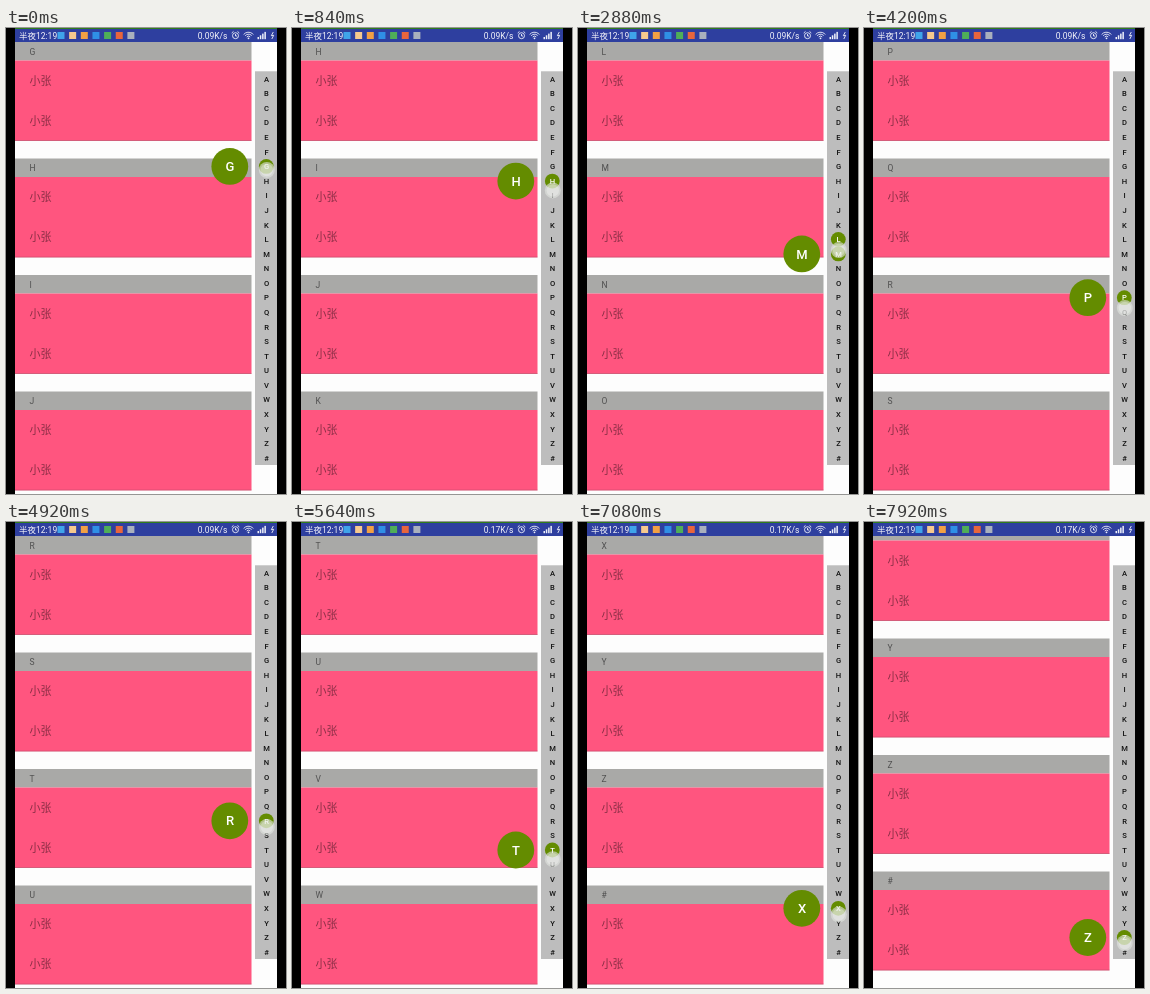
Animation of 280 by 466 pixels, one loop 8000 ms. Source, as an HTML page with a canvas:

```html
<!DOCTYPE html>
<html lang="zh">
<head>
<meta charset="utf-8">
<style>
  html, body { margin: 0; width: 100%; height: 100%; overflow: hidden; background: #000; }
  canvas { display: block; width: 280px; height: 466px; }
</style>
</head>
<body>
<canvas id="stage"></canvas>
<script>
const LOOP = 8000, STEP = 120;
const LETTERS = [...'ABCDEFGHIJKLMNOPQRSTUVWXYZ#'];
const GROUP = 116.5, TOP = 14, HEADER = 18.5, BODY = 80.3;
const BAR_TOP = 43.7, CELL = 14.58;
const MAX_SCROLL = LETTERS.length * GROUP - (466 - TOP);
const GREEN = '#648c00', PINK = '#ff557f', GRAY = '#a9a9a7';
const FONT = 'Roboto, "Noto Sans CJK SC", "Noto Sans CJK", sans-serif';
const SELECT_LAG = 90, SCROLL_LAG = 160;

// finger height over time: [ms, y]
const TOUCH = [[0, 142], [1560, 180], [2880, 222], [4200, 280], [4920, 305], [6240, 364], [7920, 421]];

const canvas = document.getElementById('stage');
const dpr = window.devicePixelRatio || 1;
canvas.width = 280 * dpr;
canvas.height = 466 * dpr;
const ctx = canvas.getContext('2d');
ctx.scale(dpr, dpr);
ctx.textBaseline = 'middle';

function touchAt(time) {
  if (time <= 0) return TOUCH[0][1];
  for (let i = 1; i < TOUCH.length; i++) {
    const [t0, y0] = TOUCH[i - 1], [t1, y1] = TOUCH[i];
    if (time <= t1) return y0 + (y1 - y0) * (time - t0) / (t1 - t0);
  }
  return TOUCH[TOUCH.length - 1][1];
}

const indexAt = time => Math.floor((touchAt(time) - BAR_TOP) / CELL);
const cellY = i => BAR_TOP + (i + 0.5) * CELL;

function rect(x, y, w, h, color) {
  ctx.fillStyle = color;
  ctx.fillRect(x, y, w, h);
}

function disc(x, y, r, color) {
  ctx.fillStyle = color;
  ctx.beginPath();
  ctx.arc(x, y, r, 0, Math.PI * 2);
  ctx.fill();
}

function text(str, x, y, size, color, align = 'left', weight = 400) {
  ctx.font = `${weight} ${size}px ${FONT}`;
  ctx.textAlign = align;
  ctx.fillStyle = color;
  ctx.fillText(str, x, y);
}

function arc(x, y, r, from, to) {
  ctx.beginPath();
  ctx.arc(x, y, r, from, to);
  ctx.stroke();
}

function line(...points) {
  ctx.beginPath();
  points.forEach(([x, y]) => ctx.lineTo(x, y));
  ctx.stroke();
}

function drawList(index) {
  const scroll = Math.min(index * GROUP, MAX_SCROLL);
  LETTERS.forEach((letter, i) => {
    const y = TOP + i * GROUP - scroll;
    if (y < -GROUP || y > 466) return;
    rect(9, y, 236.5, HEADER, GRAY);
    rect(9, y + HEADER, 236.5, BODY, PINK);
    rect(9, y + HEADER + BODY - 0.5, 236.5, 0.5, '#a8445f');
    text(letter, 23.5, y + 10.3, 8.5, '#505050');
    for (const row of [39.3, 79.3]) text('小张', 23.5, y + row, 11, '#8b2f46');
  });
}

function drawStatus(time) {
  rect(9, 0, 262, TOP, '#2e3f9f');
  rect(9, 0, 262, 1, '#2f7d1c');
  text('半夜12:19', 13, 8, 8.5, '#f4f4fa');
  ['#3fa4ea', '#f6c98e', '#f2a044', '#2f8fe6', '#4fae58', '#e8653c', '#a9b0bd'].forEach((color, i) => {
    const x = 51.5 + i * 11.65;
    rect(x, 4, 7, 7, color);
  });
  text(time < 5520 ? '0.09K/s' : '0.17K/s', 221.5, 8, 8.5, '#f4f4fa', 'right');

  ctx.strokeStyle = '#eef0fa';
  ctx.lineWidth = 0.9;
  arc(229.5, 7.7, 3, 0, Math.PI * 2);
  line([229.5, 6], [229.5, 8], [231, 8]);
  line([225.7, 5], [227.5, 3.4]);
  line([231.5, 3.4], [233.3, 5]);
  for (const r of [2.3, 4.3, 6.3]) arc(242.5, 10.5, r, -Math.PI * 0.78, -Math.PI * 0.22);
  disc(242.5, 10.3, 0.9, '#eef0fa');
  for (let i = 0; i < 4; i++) rect(251.5 + i * 2.3, 9 - i * 1.7, 1.5, 2.2 + i * 1.7, '#eef0fa');
  line([267.3, 4], [265.3, 7.7], [267.7, 7.3], [265.8, 11]);
}

function drawIndexBar(selected, previous) {
  rect(249, 43.3, 22, 393.7, '#bdbdbd');
  const active = new Set([selected, previous]);
  LETTERS.forEach((letter, i) => {
    const on = active.has(i);
    if (on) disc(260.3, cellY(i), 7.4, GREEN);
    text(letter, 260.5, cellY(i) + 0.5, 7.6, on ? '#fff' : '#111', 'center', 500);
  });
}

function drawTouch(y) {
  disc(260.8, y, 8, 'rgba(225, 228, 222, 0.62)');
  disc(260.8, y, 6.2, 'rgba(255, 255, 255, 0.3)');
}

function draw(time) {
  const selected = indexAt(time - SELECT_LAG);
  const listed = indexAt(time - SCROLL_LAG);
  rect(0, 0, 280, 466, '#000');
  rect(9, 0, 262, 466, '#fdfdfd');
  drawList(listed);
  drawStatus(time);
  drawIndexBar(selected, listed);
  disc(223.8, cellY(selected), 18.4, GREEN);
  text(LETTERS[selected], 224, cellY(selected) + 0.8, 13, '#fff', 'center', 500);
  drawTouch(touchAt(time));
}

const start = performance.now();
function frame() {
  const time = (performance.now() - start) % LOOP;
  draw(Math.floor(time / STEP) * STEP);
  requestAnimationFrame(frame);
}
frame();
</script>
</body>
</html>
```
